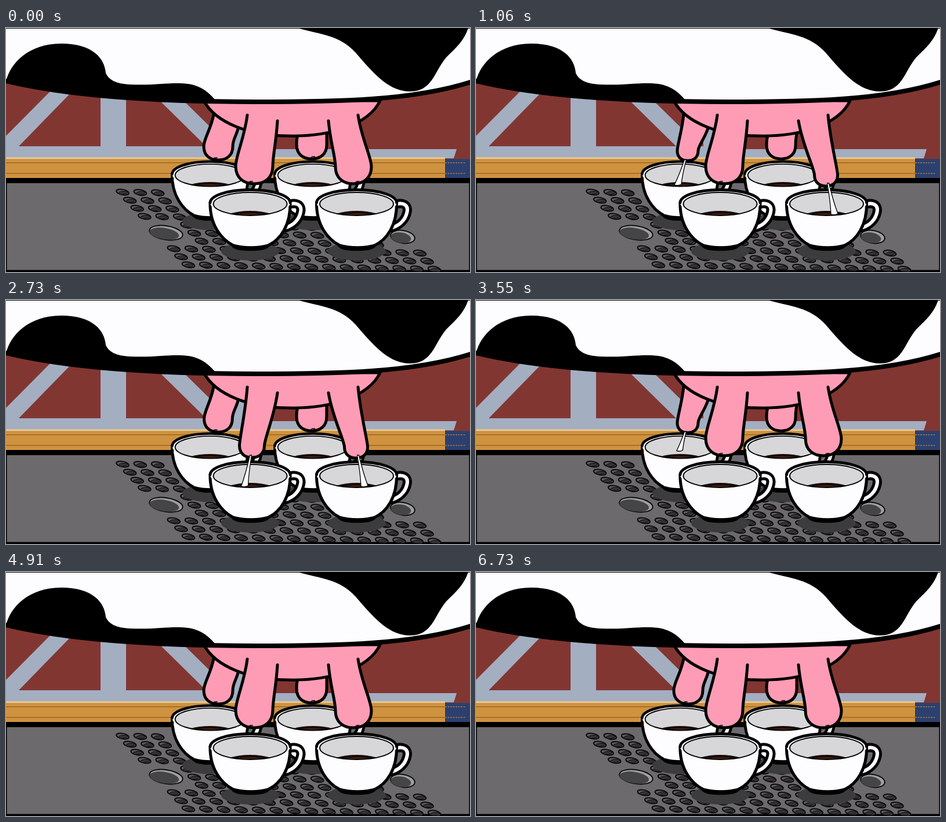
An HTML page with a canvas that plays this animation: 800 by 423 pixels, repeating every 6760 ms.

```html
<!DOCTYPE html>
<html lang="en">
<head>
<meta charset="utf-8">
<title>Fresh milk coffee</title>
<style>
html, body { margin: 0; width: 100%; height: 100%; overflow: hidden; background: #000; }
canvas { display: block; width: 100vw; height: 100vh; }
</style>
</head>
<body>
<canvas id="stage" width="800" height="423"></canvas>
<script>
const ctx = document.getElementById('stage').getContext('2d');
const LOOP = 6760;
const BEAT = LOOP / 4;
const PINK = '#ff9cb5', BEAM = '#a3aec1', WHITE = '#fdfcfe';

function shape(d, fill, line, width) {
  const p = new Path2D(d);
  if (fill) { ctx.fillStyle = fill; ctx.fill(p); }
  if (line) { ctx.strokeStyle = line; ctx.lineWidth = width; ctx.stroke(p); }
}

function rect(x, y, w, h, fill) {
  ctx.fillStyle = fill;
  ctx.fillRect(x, y, w, h);
}

function oval(x, y, rx, ry, fill, line, width, turn = 0) {
  ctx.beginPath();
  ctx.ellipse(x, y, rx, ry, turn, 0, Math.PI * 2);
  if (fill) { ctx.fillStyle = fill; ctx.fill(); }
  if (line) { ctx.strokeStyle = line; ctx.lineWidth = width; ctx.stroke(); }
}

const mix = (a, b, k) => a + (b - a) * k;

function ramp(t, a, b) {
  const k = Math.min(1, Math.max(0, (t - a) / (b - a)));
  return k * k * (3 - 2 * k);
}

function barn() {
  rect(0, 0, 800, 230, '#823632');
  shape('M78 108L116 108L22 205H0V187Z', BEAM);
  shape('M260 121H301L386 205H345Z', BEAM);
  rect(163, 100, 44, 110, BEAM);
  rect(392, 100, 44, 110, BEAM);
  shape('M0 205H436V210H777L772 226H0Z', BEAM);

  rect(0, 225, 757, 36, '#cf923e');
  rect(0, 224, 757, 3, '#e5c795');
  rect(757, 227, 43, 34, '#2c4070');
  for (const y of [233, 251.5]) {
    rect(0, y, 757, 1.2, '#8f5e22');
    for (let x = 757; x < 793; x += 4.5) rect(x, y, 3, 1.2, '#b98236');
  }
}

function hole(x, y) {
  oval(x, y, 11, 4.7, '#5a595b', '#0b0b0c', 2, 0.2);
  oval(x + 1, y + 1, 8, 2.8, '#343335', '#0b0b0c', 1, -0.1);
}

function drain(x, y, rx, ry) {
  oval(x, y, rx, ry, '#a09fa1', '#0b0b0c', 2, 0.16);
  oval(x - 3, y + 1.5, rx - 3.5, ry - 2, '#454447', null, 0, 0.16);
}

function counter() {
  rect(0, 260, 800, 163, '#000');
  rect(1.5, 269, 797, 150.5, '#6c6a6c');
  for (let row = 0; row < 10; row++) {
    const from = row > 3 && row < 7 ? 2 : 0;
    const to = row < 4 ? 2 : row < 7 ? 12 : 14;
    for (let col = from; col <= to; col++) {
      hole(201 + row * 12.6 + col * 30.3, 284.5 + row * 14 + col * 0.55);
    }
  }
  drain(276, 355, 29, 12);
  drain(684, 362, 21, 11);
}

// Cup centred on x with its rim top at y
function cup(x, y, sx, sy) {
  ctx.save();
  ctx.translate(x, y);
  ctx.scale(sx, sy);
  oval(0, 107, 50, 16, '#3c3b3d');
  const handle = 'M64 27C77 21 90 25 87 39C84 53 74 62 62 66';
  shape(handle, null, '#000', 16);
  shape(handle, null, WHITE, 6);
  shape('M-30 97C-24 106 25 106 31 97Z', WHITE, '#000', 5);
  shape('M-69 22C-70 62-49 87-29 97C-12 102 15 102 31 97C52 87 70 62 69 22Z', WHITE, '#000', 5);
  oval(0, 23, 69, 23, WHITE, null);
  shape('M-69 23C-69 11-40 0.5 0 0.5S69 11 69 23', null, '#000', 4.8);
  oval(0, 25, 63.5, 20, '#d7d6d8');
  ctx.save();
  ctx.clip();
  oval(0, 52, 48, 15, '#150a07');
  oval(0, 55, 38, 14, '#43200f');
  ctx.restore();
  oval(0, 25, 63.5, 20, null, '#000', 2);
  ctx.restore();
}

// Roots are where the sides meet the udder; tip is [x, y, half width]
const teats = {
  back: { roots: [358, 150, 401, 170], rest: [366, 229, 25], tight: [365, 230, 18],
    flow: [361, 228, 348, 272], starts: [0, 1450, 3165] },
  spare: { roots: [503, 184, 553, 180], rest: [527, 227, 26], tight: [526, 227, 25],
    starts: [0, 1450, 3165] },
  left: { roots: [416, 151, 468, 161], rest: [428, 270, 32], tight: [424, 273, 21.5],
    flow: [422, 269, 411.5, 323], starts: [1860, 1860 + BEAT] },
  right: { roots: [556, 161, 607, 151], rest: [599, 270, 31], tight: [603.5, 274, 20],
    flow: [607, 269, 618, 323], starts: [0, BEAT, 2 * BEAT, 3 * BEAT] }
};

// One pulse: squeeze, pour, stop, relax
function pose({ starts }, t) {
  const p = t - Math.max(...starts.filter(s => s <= t), -LOOP);
  return {
    squeeze: ramp(p, 150, 300) - ramp(p, 1150, 1310),
    milk: ramp(p, 300, 410) - ramp(p, 1060, 1150)
  };
}

function teat({ roots, rest, tight }, squeeze) {
  const [lx, ly, rx, ry] = roots;
  const [x, y, w] = rest.map((n, i) => mix(n, tight[i], squeeze));
  const l = x - w, r = x + w, side = y - w * 0.95;
  shape(`M${lx} ${ly}C${mix(lx, l, 0.25)} ${mix(ly, side, 0.45)} ${l} ${y - w * 1.5} ${l} ${side}` +
    `C${l} ${y - w * 0.3} ${x - w * 0.55} ${y} ${x} ${y}` +
    `S${r} ${y - w * 0.3} ${r} ${side}` +
    `C${r} ${y - w * 1.5} ${mix(rx, r, 0.25)} ${mix(ry, side, 0.45)} ${rx} ${ry}`,
    PINK, '#000', 5);
  if (squeeze < 0.5) {
    const tip = mix(lx, x, 0.6);
    const mark = x < 420 ? 361 : x > 590 ? 606 : x < 500 ? 422 : tip + 12;
    shape(`M${mark - 3} ${y - 3}q3-2 6-1`, null, '#000', 1.5);
  }
}

function stream({ flow }, milk) {
  if (!flow || milk < 0.02) return;
  const [x, y, bx, by] = flow;
  const ex = mix(x, bx, milk), ey = mix(y, by, milk);
  const half = mix(3, 6, milk);
  const mx = mix(x, ex, 0.6), my = mix(y, ey, 0.6);
  shape(`M${x - 1.5} ${y}Q${mx - 2.5} ${my} ${ex - half} ${ey}` +
    `Q${ex} ${ey + 2} ${ex + half} ${ey - 1}Q${mx + 2.5} ${my} ${x + 1.5} ${y}Z`,
    WHITE, '#000', 1.3);
}

function cow() {
  const edge = 'M0 92C120 121 280 128 430 128C570 128 700 126 800 94';
  const body = new Path2D(edge + 'V0H0Z');
  ctx.fillStyle = WHITE;
  ctx.fill(body);
  ctx.save();
  ctx.clip(body);
  shape('M0 92C8 60 40 27 95 27C150 27 170 53 172 78C177 90 190 97 215 98' +
    'C260 100 285 93 315 97C338 101 350 112 362 126L200 140L0 120Z', '#000');
  shape('M502 0C545 12 575 12 603 43C638 84 662 110 697 110' +
    'C735 110 738 76 759 51C776 34 790 22 797 0Z', '#000');
  ctx.restore();
  shape(edge, null, '#000', 8);
  rect(0, 0, 800, 1, '#000');
}

function draw(t) {
  ctx.lineCap = ctx.lineJoin = 'round';
  const { back, spare, left, right } = teats;
  const press = part => teat(part, pose(part, t).squeeze);

  barn();
  counter();
  cup(352, 231, 0.95, 0.97);
  cup(529, 231, 0.95, 0.97);
  press(back);
  press(spare);
  shape('M341 126C361 164 420 187 485 187C558 189 625 168 645 126Z', PINK, '#000', 5);
  press(left);
  press(right);
  cow();
  cup(421, 280, 1, 1);
  cup(604.5, 280, 1, 1);
  for (const part of [back, left, right]) stream(part, pose(part, t).milk);
}

const begin = performance.now();
function tick() {
  const t = (performance.now() - begin) % LOOP;
  draw(Math.floor(t / 30) * 30);
  requestAnimationFrame(tick);
}
tick();
</script>
</body>
</html>
```
